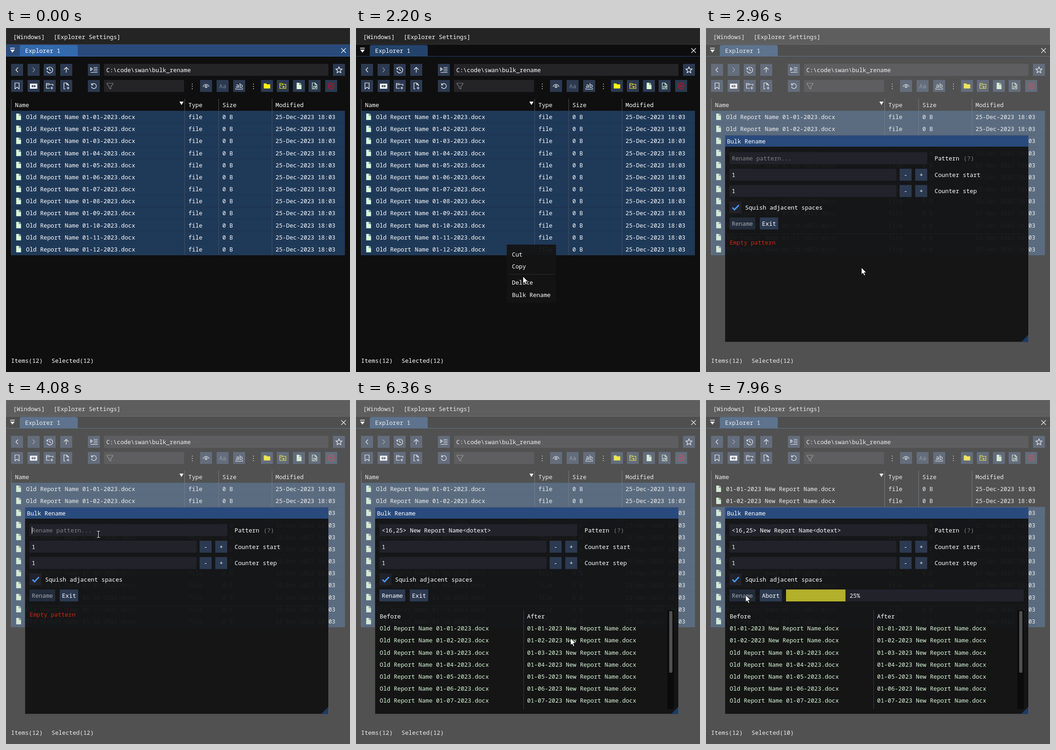
An HTML page with a canvas that plays this animation: 748 by 748 pixels, repeating every 8000 ms.

```html
<!DOCTYPE html>
<html lang="en">
<head>
<meta charset="utf-8">
<title>Bulk rename</title>
<style>
html, body { margin: 0; height: 100%; overflow: hidden; background: #0f0f0f; }
canvas { display: block; width: 748px; height: 748px; }
</style>
</head>
<body>
<canvas id="stage" width="748" height="748"></canvas>
<script>
const ctx = document.getElementById('stage').getContext('2d');

const LOOP = 8000, STEP = 40;
const MENU_OPEN = 1600, DIALOG_OPEN = 2640, FOCUS = 3640;
const TYPE_START = 4100, TYPE_END = 5200, RENAME = 7720, PER_FILE = 80;
const PATTERN = '<16,25> New Report Name<dotext>';
const ROW = 26.17, CHAR = 7.667;

const WHITE = '#fff', GREY = '#808080', GREEN = '#d9f8d9', YELLOW = '#fff21a', RED = '#d01218';
const BUTTON = '#2c3a51', FIELD = '#21222a', HOVER = '#387bcb', SELECTED = '#1f3958';

// Pointer stops: time, x, y
const POINTER = [
  [1040, 760, 650], [1560, 328, 471], [1720, 328, 471], [2200, 363, 540],
  [2520, 374, 581], [2760, 374, 581], [3440, 201, 292], [5200, 201, 292],
  [5560, 418, 514], [5680, 418, 514], [6000, 430, 600], [6440, 470, 510],
  [6600, 470, 510], [7320, 288, 476], [7400, 288, 476], [7640, 86, 424]
];

// Icons on a 16-unit grid
const FILE = 'M3 1h6v4.5h4.5V15H3zM10 1l3.5 3.5H10z';
const FILE_LINE = 'M6 14.5H3v-13h6l4 4V8M9 1.5v4h4';
const FOLDER_LINE = 'M8 13H1V2.5h5l1.5 2H15V8M1 5.5h5.5l1-1';
const ICONS = {
  back: 'M10 3L5.5 8l4.5 5',
  forward: 'M6 3l4.5 5L6 13',
  history: 'M2 3v3.5h3.5M2.2 6.2A6.4 6.4 0 1 1 2 10M8 4.5V8.5l3 1.7',
  up: 'M8 14V2.5M3 7.5l5-5 5 5',
  path: 'M1 3.5v6l4-3zM7.5 3H16M7.5 6.5H16M7.5 10H16M1 13.5h15',
  star: 'M8 1.5l1.9 4.4 4.8.4-3.6 3.2 1.1 4.7L8 11.7l-4.2 2.5 1.1-4.7L1.3 6.3l4.8-.4z',
  bookmark: 'M3.5 1.5h9v13L8 10.5l-4.5 4z',
  folderPlus: FOLDER_LINE + 'M12.5 9.5v6M9.5 12.5h6',
  filePlus: FILE_LINE + 'M12 9.5v6M9 12.5h6',
  refresh: 'M3 2v4h4M3.3 5.7A5.4 5.4 0 1 1 2.8 9.5',
  filter: 'M1.5 2h13v2L10 9v5.5l-4-2V9L1.5 4z',
  eye: 'M1.5 10a6.6 6.6 0 0 1 13 0M10.2 9.5a2.2 2.2 0 1 1-4.4 0a2.2 2.2 0 1 1 4.4 0',
  folder: 'M1 2.5h5.5l1.5 2h7V13.5H1z',
  folderGo: 'M1.5 13.5V2.5h5l1.5 2h6.5v9zM1.5 6h5l1.5-1.5M5 10h6M9 7.8l2.2 2.2L9 12.2',
  fileGo: FILE_LINE + 'M6 8.5h7v6H6zM8 12.5l3-2.5M9 10h2v2',
  cancel: 'M14.3 8A6.3 6.3 0 1 1 1.7 8A6.3 6.3 0 1 1 14.3 8M5.3 5.3l5.4 5.4M10.7 5.3l-5.4 5.4',
  check: 'M1 8.5l4.5 4.5L15 3',
  close: 'M3 3l10 10M13 3L3 13'
};

const clamp = v => Math.min(1, Math.max(0, v));
const two = n => String(n).padStart(2, '0');

function box(x, y, w, h, color) {
  ctx.fillStyle = color;
  ctx.fillRect(x, y, w, h);
}

function text(str, x, y, color = WHITE) {
  ctx.fillStyle = color;
  ctx.fillText(str, x, y + 4.5);
}

function shape(path, x, y, { fill, stroke, width = 1.2 }) {
  const p = new Path2D(path);
  ctx.save();
  ctx.translate(x, y);
  ctx.lineWidth = width;
  if (fill) { ctx.fillStyle = fill; ctx.fill(p); }
  if (stroke) { ctx.strokeStyle = stroke; ctx.stroke(p); }
  ctx.restore();
}

const icon = (name, x, y, color = WHITE, width) =>
  shape(ICONS[name], x - 8, y - 8, { stroke: color, width });
const solid = (path, x, y, color) => shape(path, x - 8, y - 8, { fill: color });

function tool(x, y, name, color) {
  box(x - 13, y - 13, 26, 26, BUTTON);
  if (name) icon(name, x, y, color);
}

function button(label, x, y, w, enabled, hover) {
  ctx.globalAlpha = enabled ? 1 : 0.6;
  box(x, y - 13, w, 26, enabled && hover ? '#4296fa' : BUTTON);
  text(label, x + (w - label.length * CHAR) / 2, y);
  ctx.globalAlpha = 1;
}

function pointerAt(t) {
  let i = POINTER.findIndex(p => p[0] > t);
  if (i === 0) return { x: 800, y: 800 };
  if (i < 0) i = POINTER.length;
  const a = POINTER[i - 1], b = POINTER[i] || a;
  const k = clamp((t - a[0]) / (b[0] - a[0] || 1)), e = k * k * (3 - 2 * k);
  return { x: a[1] + (b[1] - a[1]) * e, y: a[2] + (b[2] - a[2]) * e };
}

const inside = (m, x, y, w, h) => m.x >= x && m.x < x + w && m.y >= y && m.y < y + h;

const oldName = i => `Old Report Name 01-${two(i + 1)}-2023.docx`;
const newName = (i, pattern) => pattern
  .replace('<16,25>', oldName(i).slice(16, 26))
  .replace('<dotext>', '.docx');

function drawToolbar() {
  tool(24, 91, 'back');
  tool(60, 91, 'forward', '#929aa6');
  tool(95, 91, 'history');
  tool(131, 91, 'up');
  tool(191, 91, 'path');
  box(213, 78, 488, 26, '#242427');
  text('C:\\code\\swan\\bulk_rename', 218, 91.5);
  tool(724, 91, 'star');

  tool(24, 126, 'bookmark');
  tool(60, 126);
  box(52, 121, 16, 11, WHITE);
  shape('M7 3L4 5.5 7 8M4 5.5h8M9 3l3 2.5L9 8', 52, 121, { stroke: BUTTON, width: 1.4 });
  tool(95, 126, 'folderPlus');
  tool(131, 126, 'filePlus');
  tool(191, 126, 'refresh');
  box(213, 113, 174, 26, '#242427');
  icon('filter', 226, 126, GREY);
  for (const x of [404, 537])
    for (const y of [121, 126, 131]) box(x, y, 2, 2, '#a0a0a0');
  tool(435, 126, 'eye');
  tool(471, 126);
  text('Aa', 463.5, 126, '#7b8491');
  tool(507, 126);
  text('ab', 499.5, 125);
  shape('M0 0v2h15v-2', 499.5, 131, { stroke: WHITE, width: 1 });
  tool(567.5, 126);
  solid(ICONS.folder, 567.5, 126, YELLOW);
  tool(602, 126, 'folderGo', YELLOW);
  tool(637, 126);
  solid(FILE, 637, 126, GREEN);
  tool(671, 126, 'fileGo', GREEN);
  tool(707, 126, 'cancel', RED);
}

function drawExplorer(focused, mouse, renamed) {
  box(0, 0, 748, 748, '#0f0f0f');
  box(0, 0, 748, 36, '#242424');
  ctx.lineWidth = 1;
  ctx.strokeStyle = '#3a3a42';
  ctx.strokeRect(0.5, 0.5, 747, 35);
  text('[Windows]', 15.5, 19);
  text('[Explorer Settings]', 103.5, 19);

  const tab = focused ? '#3369ad' : '#23436c';
  box(0, 36, 748, 26, focused ? '#294a7a' : '#0d0d0e');
  box(0, 61, 748, 1, tab);
  shape('M30 62V41q0-4 4-4H152q4 0 4 4V62z', 0, 0, { fill: tab });
  text('Explorer 1', 41.5, 49.5);
  shape('M9 43h10v1.5H9zM9 47h10l-5 6.5z', 0, 0, { fill: WHITE });
  icon('close', 734, 49);
  drawToolbar();

  for (let i = 0; i < 12; i++) {
    const top = 180 + ROW * i, y = 193.6 + ROW * i;
    const hover = !!mouse && inside(mouse, 12, top, 725, ROW);
    if (hover || i >= renamed) box(12, top, 725, ROW + 0.1, hover ? HOVER : SELECTED);
    solid(FILE, 27.2, y - 0.6, GREEN);
    text(i < renamed ? newName(i, PATTERN) : oldName(i), 43.5, y);
    text('file', 396.5, y);
    text('0 B', 470.5, y);
    text('25-Dec-2023 18:03', 586, y);
  }
  text('Name', 19.5, 167.5);
  text('Type', 396.5, 167.5);
  text('Size', 470.5, 167.5);
  text('Modified', 586, 167.5);
  shape('M377 160h9l-4.5 7.5z', 0, 0, { fill: WHITE });
  for (const x of [11, 388, 462, 578]) {
    box(x, 154, 1, 26, '#4f4f59');
    box(x, 180, 1, 314, '#47505e');
  }
  text('Items(12)', 11, 723);
  text(`Selected(${12 - renamed})`, 99, 723);
}

function drawMenu(mouse) {
  box(328, 471, 107, 127, 'rgba(20,20,20,.94)');
  const items = { 'Cut': 492, 'Copy': 518.2, 'Delete': 553.8, 'Bulk Rename': 580 };
  for (const [label, y] of Object.entries(items)) {
    if (inside(mouse, 333, y - 13, 97, 26)) box(333, y - 13, 97, 26, HOVER);
    text(label, 339, y);
  }
  box(333, 535, 97, 1, '#2b2b2f');
}

function drawPreview(pattern, mouse, renamed) {
  if (inside(mouse, 51, 457, 313, 26)) box(51, 457, 313, 26, HOVER);
  if (inside(mouse, 365, 457, 312, 26)) box(365, 457, 312, 26, HOVER);
  text('Before', 51.5, 470.5);
  text('After', 372, 470.5);
  for (let i = 0; i < 7; i++) {
    const y = 496.8 + ROW * i;
    text(i < renamed ? newName(i, PATTERN) : oldName(i), 51.5, y, GREEN);
    text(newName(i, pattern), 372, y, GREEN);
  }
  box(364, 457, 1, 215, '#3b3b40');
  box(677, 457, 14, 215, '#0b0b0b');
  shape('M681 461q0-2 2-2h3q2 0 2 2V591q0 2-2 2h-3q-2 0-2-2z', 0, 0, { fill: '#4f4f4f' });
}

function drawDialog(t, mouse, renamed, progress) {
  box(41, 233, 660, 450, 'rgba(17,17,17,.94)');
  box(41, 233, 660, 25, '#294a7c');
  ctx.lineWidth = 1;
  ctx.strokeStyle = 'rgba(110,110,128,.4)';
  ctx.strokeRect(41.5, 233.5, 660, 449);
  shape('M701 667v16h-16z', 0, 0, { fill: '#1e3a60' });
  text('Bulk Rename', 45.5, 246);

  const typed = Math.floor(PATTERN.length * clamp((t - TYPE_START) / (TYPE_END - TYPE_START)));
  const pattern = PATTERN.slice(0, typed);
  const valid = /^([^<]|<[^<>]*>)+$/.test(pattern);
  const busy = t >= RENAME;

  box(51, 270, 430, 26, FIELD);
  text(pattern || 'Rename pattern...', 56, 283.5, pattern ? WHITE : GREY);
  const blinkFrom = t < TYPE_START ? FOCUS : TYPE_END;
  const blinkOn = (t > TYPE_START && t < TYPE_END) || (t - blinkFrom) % 1200 <= 800;
  if (t >= FOCUS && !busy && blinkOn) box(56 + Math.round(typed * CHAR), 276, 1, 15, WHITE);
  text('Pattern', 497, 283.5);
  text('(?)', 560, 283.5, GREY);

  [['Counter start', 319], ['Counter step', 354.5]].forEach(([label, y]) => {
    box(51, y - 13, 363, 26, FIELD);
    text('1', 56, y);
    button('-', 421, y, 26, true);
    button('+', 455, y, 26, true);
    text(label, 497, y);
  });

  box(51, 377, 26, 26, FIELD);
  icon('check', 64.5, 390, '#4a96f5', 3);
  text('Squish adjacent spaces', 85, 390.5);

  button('Rename', 51, 425, 56, valid && !busy, inside(mouse, 51, 412, 56, 26));
  button(busy ? 'Abort' : 'Exit', 117, 425, busy ? 48 : 40, true);
  if (busy) {
    const w = 517 * progress;
    box(174, 412, 517, 26, FIELD);
    box(174, 412, w, 26, '#b3b02a');
    text(Math.round(progress * 100) + '%', 183 + w, 425.5);
  }

  box(51, 447, 640, 1, '#1f1f22');
  if (valid) drawPreview(pattern, mouse, renamed);
  else if (!pattern) text('Empty pattern', 51.5, 466, '#d9230f');
}

function drawPointer(m, dialog) {
  const overField = dialog && (inside(m, 51, 270, 430, 26) ||
    inside(m, 51, 306, 363, 26) || inside(m, 51, 341, 363, 26));
  if (overField) {
    const beam = 'M-3.5-7H-1L0-6 1-7H3.5M0-6V6M-3.5 7H-1L0 6 1 7H3.5';
    shape(beam, m.x, m.y, { stroke: '#000', width: 3 });
    shape(beam, m.x, m.y, { stroke: WHITE, width: 1.2 });
  } else {
    shape('M0 0V15.5L3.5 12.2 6 17.8 8.6 16.7 6.2 11.2H11z', m.x, m.y,
      { fill: WHITE, stroke: '#000', width: 1 });
  }
}

function draw(t) {
  ctx.font = '12.78px "Roboto Mono", "Noto Sans Mono", monospace';
  const mouse = pointerAt(t);
  const dialog = t >= DIALOG_OPEN;
  const menu = t >= MENU_OPEN && !dialog;
  const handled = Math.max(0, Math.floor((t - RENAME) / PER_FILE));
  const renamed = Math.max(0, handled - 1);

  drawExplorer(t < MENU_OPEN, t < MENU_OPEN && mouse, renamed);
  if (menu) drawMenu(mouse);
  if (dialog) {
    box(0, 0, 748, 748, `rgba(204,204,204,${0.35 * clamp((t - DIALOG_OPEN) / 170)})`);
    drawDialog(t, mouse, renamed, handled / 12);
  }
  drawPointer(mouse, dialog);
}

let start;
function tick(now) {
  start ??= now;
  draw(Math.floor((now - start) % LOOP / STEP) * STEP);
  requestAnimationFrame(tick);
}
requestAnimationFrame(tick);
</script>
</body>
</html>
```
